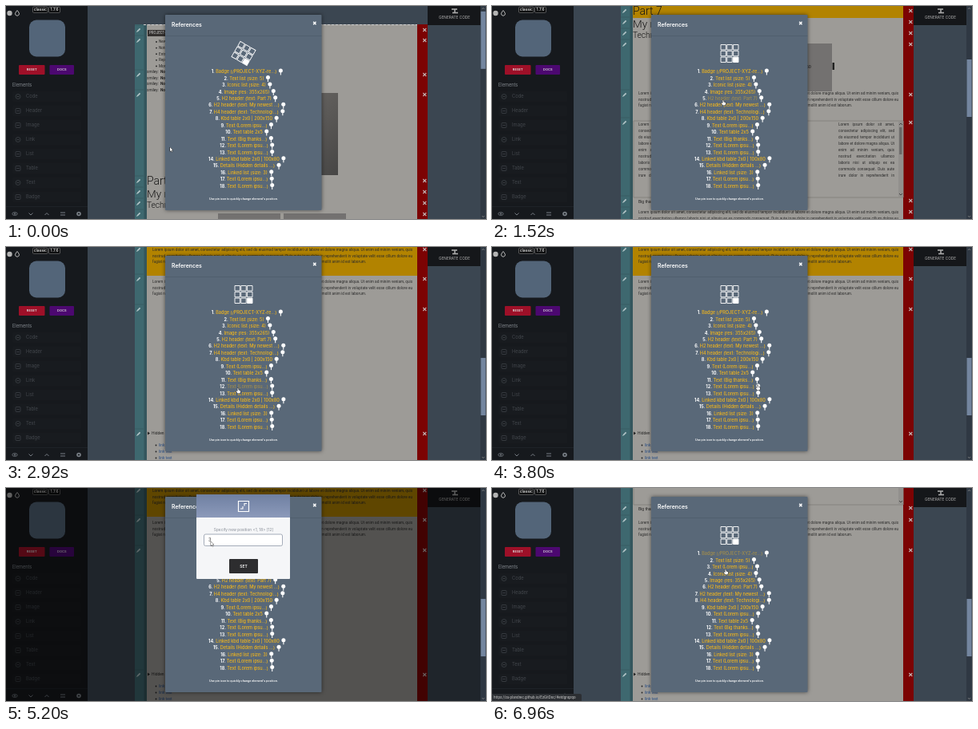
These frames come from a looping animation (600 px wide and 267 px high, 7000 ms). An HTML page with a canvas:

```html
<!DOCTYPE html>
<html lang="en">
<head>
<meta charset="utf-8">
<title>References</title>
<style>
html, body { margin: 0; width: 100%; height: 100%; overflow: hidden; background: #3b4651; }
canvas { display: block; width: 600px; height: 267px; }
</style>
</head>
<body>
<canvas id="stage"></canvas>
<script>
const W = 600, H = 267, LOOP = 7000;
const canvas = document.getElementById('stage');
const c = canvas.getContext('2d');
const ratio = window.devicePixelRatio || 1;
canvas.width = W * ratio;
canvas.height = H * ratio;

const UI = 'Inter, "Open Sans", sans-serif';
const DOC = 'Roboto, "Open Sans", sans-serif';
const LOREM = 'Lorem ipsum dolor sit amet, consectetur adipiscing elit, sed do eiusmod tempor incididunt ut labore et dolore magna aliqua. Ut enim ad minim veniam, quis nostrud exercitation ullamco laboris nisi ut aliquip ex ea commodo consequat. Duis aute irure dolor in reprehenderit in voluptate velit esse cillum dolore eu fugiat nulla pariatur. Excepteur sint occaecat cupidatat non proident, sunt in culpa qui officia deserunt mollit anim id est laborum.';

const ITEMS = [
  'Badge (/PROJECT-XYZ-re...)', 'Text list (size: 5)', 'Iconic list (size: 4)',
  'Image (res: 355x265)', 'H2 header (text: Part 7)', 'H2 header (text: My newest ...)',
  'H4 header (text: Technologi...)', 'Kbd table 2x0 | 200x150', 'Text (Lorem ipsu...)',
  'Text table 2x5', 'Text (Big thanks...)', 'Text (Lorem ipsu...)', 'Text (Lorem ipsu...)',
  'Linked kbd table 2x0 | 100x80', 'Details (Hidden details ...)', 'Linked list (size: 3)',
  'Text (Lorem ipsu...)', 'Text (Lorem ipsu...)'
];
const MOVED = ITEMS.slice();
MOVED.splice(2, 0, MOVED.splice(11, 1)[0]);

// [time, value...]
const SCROLL = [[0, -213], [860, -213], [1480, 0], [2100, 0], [2660, 255]];
const SPIN = [[0, 30], [520, 0]];
const DIALOG = [[3900, 0], [4240, 1], [5800, 1], [6040, 0]];
const SHADE = [[3900, 0], [4240, .47], [5900, .47], [6200, 0]];
const POINTER = [
  [0, 205, 177], [160, 205, 177], [720, 289, 118], [1560, 289, 118], [2040, 290, 177],
  [2920, 290, 177], [3480, 332, 173], [4100, 332, 173], [4280, 327, 164],
  [4680, 262, 66], [4980, 255, 66], [5160, 255, 66], [5560, 294, 103], [6300, 294, 103], [6960, 292, 102]
];
// [start, end, row]
const HOVERS = [[680, 1680, 4], [2020, 3100, 11], [5800, 7200, 0]];
const REORDER = 5760, TYPED = 5160, CLEARED = 5000, STATUS = 6200;

const clamp = v => Math.max(0, Math.min(1, v));
const ease = p => p * p * (3 - 2 * p);

function track(keys, t, i = 1) {
  if (t <= keys[0][0]) return keys[0][i];
  for (let k = 1; k < keys.length; k++) {
    const a = keys[k - 1], b = keys[k];
    if (t < b[0]) return a[i] + (b[i] - a[i]) * ease((t - a[0]) / (b[0] - a[0]));
  }
  return keys[keys.length - 1][i];
}

function box(x, y, w, h, fill, r = 0, stroke) {
  c.beginPath();
  c.roundRect(x, y, w, h, r);
  if (fill) { c.fillStyle = fill; c.fill(); }
  if (stroke) { c.strokeStyle = stroke; c.stroke(); }
}

function dot(x, y, r, fill) {
  c.beginPath();
  c.arc(x, y, r, 0, 7);
  c.fillStyle = fill;
  c.fill();
}

function line(points, color, width = 1, closed) {
  c.beginPath();
  points.forEach(([x, y]) => c.lineTo(x, y));
  if (closed) c.closePath();
  c.strokeStyle = color;
  c.lineWidth = width;
  c.stroke();
}

function text(s, x, y, size, color, { weight = 400, font = UI, align = 'left' } = {}) {
  c.font = `${weight} ${size}px ${font}`;
  c.textAlign = align;
  c.textBaseline = 'middle';
  c.fillStyle = color;
  c.fillText(s, x, y);
}

function cross(x, y, r, color, width) {
  line([[x - r, y - r], [x + r, y + r]], color, width);
  line([[x + r, y - r], [x - r, y + r]], color, width);
}

function paragraph(x, y, width, pitch, maxLines = 9) {
  c.font = `400 4.7px ${DOC}`;
  c.textAlign = 'left';
  c.textBaseline = 'middle';
  c.fillStyle = '#2b2b2b';
  const measure = s => c.measureText(s).width;
  const lines = [[]];
  for (const word of LOREM.split(' ')) {
    const last = lines[lines.length - 1];
    if (last.length && measure([...last, word].join(' ')) > width) lines.push([word]);
    else last.push(word);
  }
  lines.slice(0, maxLines).forEach((words, i) => {
    const spare = width - measure(words.join(''));
    const gap = i === lines.length - 1 || words.length < 2 ? measure(' ') : spare / (words.length - 1);
    let px = x;
    for (const word of words) {
      c.fillText(word, px, y + i * pitch);
      px += measure(word) + gap;
    }
  });
}

function pencil(x, y) {
  line([[x - 2, y + 2], [x + 1.6, y - 1.6]], '#b4c6c8', 1.7);
  line([[x - 2.8, y + 2.8], [x - 2, y + 2]], '#b4c6c8', .8);
}

function marker(y) {
  line([[161, y - 6], [172, y - 6]], '#34565d', .6);
  pencil(166, y);
  cross(523.3, y, 2, '#c2b4b4', 1.1);
}

function drawPage(scroll, t) {
  const moved = t >= REORDER;
  const body = { font: DOC };
  const top = -190 - scroll;
  box(0, 0, W, H, '#3b4651');
  c.save();
  c.translate(0, Math.max(0, top));
  box(161, 0, 15, H, '#3e686f');
  box(172.5, 0, 3.5, H, '#34565d');
  box(176, 0, 338, H, '#9d9b97');
  box(514, 0, 13, H, '#7c0303');
  c.restore();
  c.setLineDash([3, 2]);
  line([[172, top + .5], [514, top + .5]], '#d0d0d0');
  c.setLineDash([]);

  c.save();
  c.translate(0, -scroll + (moved ? 36 : 0));
  // upper part of the document
  box(177, -183, 34, 8, '#33302e');
  text('PROJECT-XYZ', 179, -179, 4.5, '#ccc', body);
  for (let i = 0; i < 5; i++) {
    const y = -168 + i * 7.6;
    dot(188, y, .9, '#222');
    text(['New idea', 'Notes', 'Entry', 'Repeat', 'More'][i], 191, y, 4.7, '#222', body);
  }
  for (let i = 0; i < 4; i++) {
    const y = -130 + i * 7.4;
    text('smiley:', 176, y, 4.7, '#222', body);
    text('Normal text', 193, y, 4.7, '#222', { font: DOC, weight: 700 });
  }
  const photo = c.createLinearGradient(330, -104, 415, 0);
  photo.addColorStop(0, '#6e6b68');
  photo.addColorStop(1, '#474645');
  box(330, -104, 85, 103, photo);
  if (t >= 860 && t < 2400) box(176, -2, 338, 17, '#b28300');
  text('Part 7', 176, 7, 14, '#151515', { font: DOC, weight: 300 });
  text('My newest project', 176, 23, 13.5, '#151515', { font: DOC, weight: 300 });
  text('Technologies used', 176, 37, 10.2, '#151515', { font: DOC, weight: 300 });
  box(265, 47, 78, 60, '#737170');
  box(347, 47, 78, 60, '#737170');
  box(425.5, 71, 2.5, 9, '#222');
  text('200 x 150', 387, 76, 5.4, '#1c1c1c', { font: DOC, align: 'center' });
  paragraph(183, 110, 325, 7.5);
  box(177, 144, 337, 96, null, 0, '#85837f');
  paragraph(183, 149, 70, 8);
  paragraph(433, 149, 70, 8);
  box(508, 145, 5.5, 94, '#92908d');
  box(509.2, 152, 3.2, 34, '#696866');
  line([[509, 149], [511, 147], [513, 149]], '#333', .8);
  line([[509, 235], [511, 237], [513, 235]], '#333', .8);
  text('Big thanks to all of you', 183, 246, 5, '#222', body);
  for (const y of [-183, -170, -127, -102, 6, 20, 34, 48, 111, 146, 244]) marker(y);
  c.restore();

  c.save();
  c.translate(0, -scroll);
  if (!moved) {
    if (t >= 2100) box(176, 253, 338, 38, '#b28300');
    paragraph(183, 259, 325, 7.5);
    marker(258);
  }
  paragraph(183, 299, 325, 7.5);
  for (const x of [304, 348]) {
    box(x, 448, 39, 31, '#595856', 1);
    text('100 x 80', x + 19.5, 472, 6, '#161616', { font: DOC, align: 'center' });
  }
  c.beginPath();
  c.moveTo(177, 486.5);
  c.lineTo(180, 488.5);
  c.lineTo(177, 490.5);
  c.fillStyle = '#222';
  c.fill();
  text('Hidden details here', 182, 489, 4.9, '#222', body);
  for (const y of [503.5, 511.5, 519.5]) {
    dot(187.5, y, .9, '#222');
    text('link text', 191, y, 4.8, '#294f86', body);
  }
  for (const y of [295, 333, 489]) marker(y);
  c.restore();

  // scrollbar
  box(593, 0, 7, H, '#2f3843');
  box(593.5, 67 + scroll / 3.54, 6, 72, '#74869f');
  line([[595, 4], [596.5, 2.3], [598, 4]], '#888', .8);
  line([[595, 263], [596.5, 264.7], [598, 263]], '#888', .8);
  // code button
  box(527, 0, 66, 24, '#15171a');
  line([[557, 4], [564, 4]], '#aaa', 1.6);
  line([[558, 8.5], [565, 8.5]], '#aaa', 1.6);
  line([[561, 4], [561, 8]], '#aaa', 1.6);
  text('GENERATE CODE', 560.5, 14.5, 4.7, '#b5b5b5', { align: 'center' });
}

function drawSidebar() {
  const dim = '#43474d';
  box(0, 0, 102, H, '#16191d');
  dot(4.5, 9, 3.2, '#b4b4b4');
  c.beginPath();
  c.moveTo(14, 5.5);
  c.quadraticCurveTo(19, 11, 14, 12.3);
  c.quadraticCurveTo(9, 11, 14, 5.5);
  c.strokeStyle = '#b4b4b4';
  c.lineWidth = 1;
  c.stroke();
  c.lineWidth = .7;
  box(33.5, 1.3, 18.5, 7, '#08090a', 1, '#777');
  text('classic', 42.8, 4.9, 4.8, '#ddd', { weight: 600, align: 'center' });
  box(53.5, 1.3, 14, 7, '#08090a', 1, '#777');
  text('1.7.6', 60.5, 4.9, 4.8, '#ddd', { weight: 600, align: 'center' });
  box(29, 17.5, 45, 46, '#536579', 9);
  box(16, 74, 32.5, 12, '#9e1028', 1);
  text('RESET', 32.2, 80.2, 4, '#ddd', { weight: 600, align: 'center' });
  box(54.5, 74, 30.5, 12, '#4c0870', 1);
  text('DOCS', 69.8, 80.2, 4, '#ddd', { weight: 600, align: 'center' });
  text('Elements', 8, 99, 5.6, '#858b91');
  ['Code', 'Header', 'Image', 'Link', 'List', 'Table', 'Text', 'Badge'].forEach((name, i) => {
    const y = 113.5 + i * 18;
    c.lineWidth = .7;
    box(8, y - 7, 86, 14, '#181b1f', 2);
    box(12, y - 3, 6, 6, null, i % 3 ? 1 : 3, dim);
    line([[13.5, y], [16.5, y]], dim, .8);
    text(name, 25, y, 5.8, dim);
  });
  line([[0, 251.5], [102, 251.5]], '#22262b', .7);
  const tone = '#777d84';
  c.strokeStyle = tone;
  c.lineWidth = .8;
  c.beginPath();
  c.ellipse(11, 260.5, 3.2, 1.9, 0, 0, 7);
  c.stroke();
  dot(11, 260.5, 1, tone);
  line([[28.5, 259.5], [31, 262], [33.5, 259.5]], tone);
  line([[48.5, 262], [51, 259.5], [53.5, 262]], tone);
  line([[68, 259], [74, 259]], tone);
  line([[68, 262], [74, 262]], tone);
  dot(91, 260.5, 2.8, tone);
  dot(91, 260.5, 1.1, '#16191d');
}

function drawGrid(angle) {
  c.save();
  c.translate(297, 59.5);
  c.rotate(angle * Math.PI / 180);
  c.lineWidth = .9;
  for (let i = 0; i < 9; i++) {
    const x = (i % 3 - 1) * 7.8, y = (Math.floor(i / 3) - 1) * 7.8;
    box(x - 3.2, y - 3.2, 6.4, 6.4, i === 8 ? '#fff' : null, 0, '#fff');
  }
  c.restore();
}

function drawReferences(t) {
  c.save();
  c.shadowColor = 'rgba(0,0,0,.55)';
  c.shadowBlur = 5 * ratio;
  box(199, 11, 195.5, 245, '#596878', 1);
  c.restore();
  line([[199, 37.5], [394.5, 37.5]], '#4f5d6c', .8);
  text('References', 207, 24, 6.9, '#fff', { weight: 600 });
  cross(385.8, 21.5, 1.7, '#fff', 1.4);
  drawGrid(track(SPIN, t));

  (t < REORDER ? ITEMS : MOVED).forEach((label, i) => {
    const y = 82.6 + i * 8.44, num = `${i + 1}. `;
    c.font = `700 5.55px ${UI}`;
    const nw = c.measureText(num).width;
    c.font = `500 5.55px ${UI}`;
    const lw = c.measureText(label).width;
    const x = 297.5 - (nw + lw) / 2, end = x + nw + lw;
    const hover = HOVERS.reduce((m, [a, b, row]) =>
      row === i ? Math.max(m, clamp((t - a) / 150) * clamp((b - t) / 150)) : m, 0);
    text(num, x, y, 5.55, '#fff', { weight: 700 });
    c.globalAlpha = 1 - .52 * hover;
    text(label, x + nw, y, 5.55, '#f2b61c', { weight: 500 });
    c.globalAlpha = 1;
    dot(end + 5, y - 1.5, 2.5, '#fff');
    line([[end + 5, y], [end + 5, y + 4]], '#fff', 1.1);
  });
  text("Use pin icon to quickly change element's position.", 297, 242.3, 3.55, '#fff', { weight: 600, align: 'center' });
}

function drawDialog(t, shown) {
  c.save();
  c.globalAlpha = shown;
  c.translate(0, -12 * (1 - shown));
  const head = c.createLinearGradient(0, 8, 0, 37);
  head.addColorStop(0, '#6f80a2');
  head.addColorStop(1, '#8c9aba');
  box(238, 8, 117, 106, '#f5f6f8', 1);
  box(238, 8, 117, 29, head);
  c.lineWidth = 1.2;
  box(290.5, 16.5, 13, 13, null, 0, '#fff');
  line([[293, 26], [296, 26], [296, 23]], '#fff', 1.1);
  line([[298, 22.5], [298, 19.5], [301, 19.5]], '#fff', 1.1);
  text('Specify new position <1, 18> [12]', 297, 53, 4.8, '#858b95', { align: 'center' });
  c.lineWidth = .8;
  // the field turns grey once the value is sent
  box(247.5, 58, 98, 14.5, t < REORDER ? '#fff' : '#a4a8ad', 2, '#8e98a7');
  const value = t < CLEARED ? '12' : t < TYPED ? '' : '3';
  if (t > 4800 && t < CLEARED) box(252, 61.5, 8, 8, '#8db5ee');
  text(value, 253, 65.6, 5.6, '#333');
  box(279, 89, 36, 18, '#2d2d2f', 1);
  text('SET', 297, 98.3, 4.9, '#fff', { weight: 600, align: 'center' });
  c.restore();
}

function drawPointer(t) {
  const arrow = t < 500 || (t > 4080 && t < 5300);
  const shape = arrow
    ? [[0, 0], [0, 5.2], [1.2, 4.1], [2.1, 6], [2.9, 5.6], [2, 3.8], [3.6, 3.7]]
    : [[-.6, 0], [.4, 0], [.6, 2.3], [3, 2.9], [3.2, 4.6], [2.3, 6.5], [-.4, 6.5], [-2.3, 4], [-1.6, 3.3], [-.6, 4]];
  c.save();
  c.translate(track(POINTER, t, 1), track(POINTER, t, 2));
  c.lineJoin = 'round';
  line(shape, '#111', .9, true);
  c.fillStyle = '#fff';
  c.fill();
  c.restore();
}

function draw(t) {
  c.setTransform(ratio, 0, 0, ratio, 0, 0);
  const shown = track(DIALOG, t);
  drawPage(track(SCROLL, t), t);
  drawSidebar();
  box(0, 0, 593, H, `rgba(0,0,0,${track(SHADE, t)})`);
  drawReferences(t);
  if (shown > 0) drawDialog(t, shown);
  if (t >= STATUS) {
    box(0, 258, 112, 9, '#2c2f33', [0, 2, 0, 0]);
    text('https://zu-plandrec.github.io/EzGitDoc/#etdgnqzqo', 2, 262.6, 4.5, '#c8c8c8', { font: DOC });
  }
  drawPointer(t);
}

const start = performance.now();
function tick() {
  draw((performance.now() - start) % LOOP);
  requestAnimationFrame(tick);
}
tick();
</script>
</body>
</html>
```
